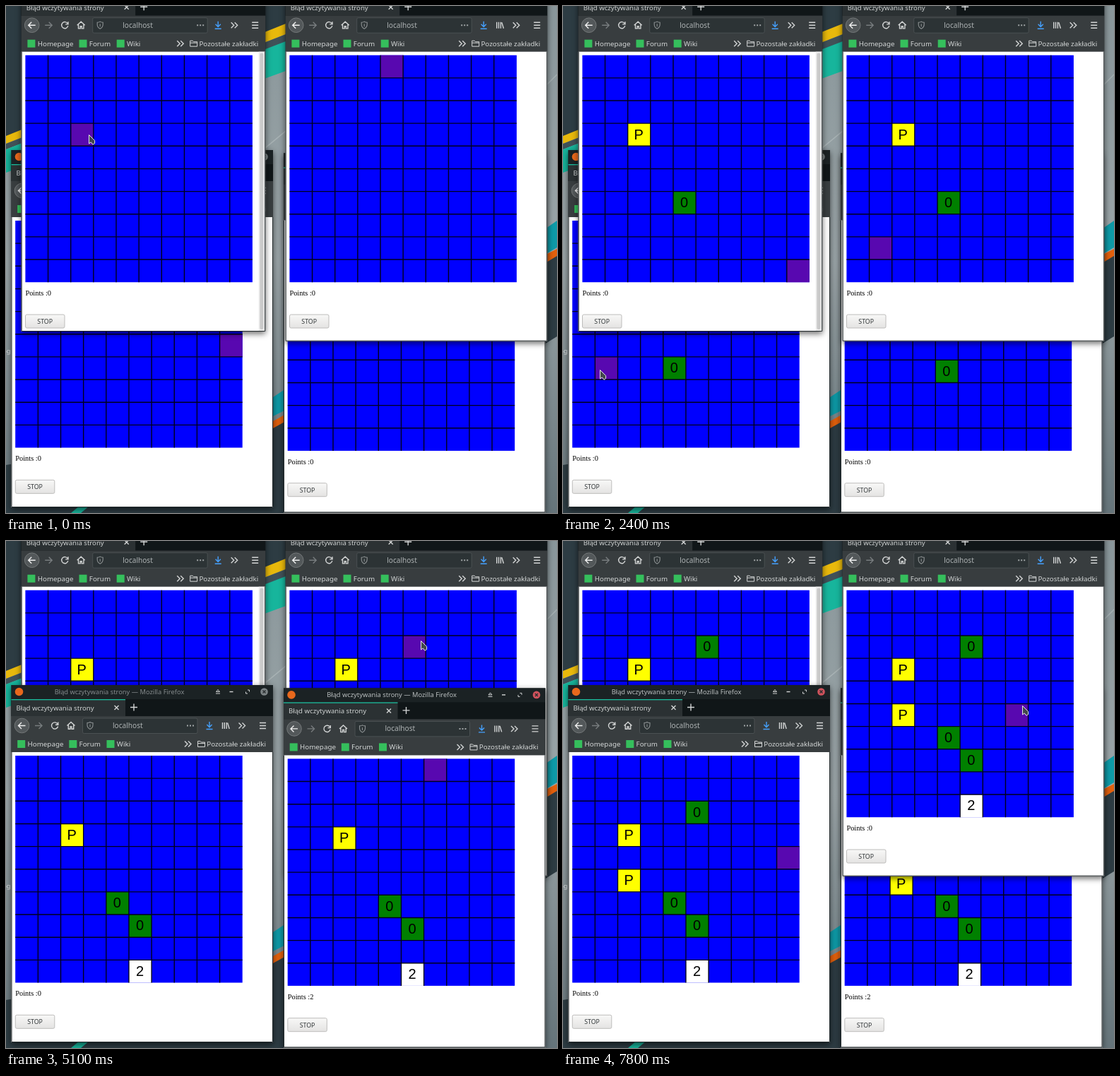
These frames come from a looping animation (780x718 px, 8 s). An HTML page:

```html
<!DOCTYPE html>
<html lang="pl">
<head>
<meta charset="utf-8">
<title>Board game in four windows</title>
<style>
html, body { margin: 0; width: 100%; height: 100%; overflow: hidden; background: #3a474d; }
svg { display: block; width: 780px; height: 718px; font-family: "Noto Sans", sans-serif; }
.frame { filter: drop-shadow(0 3px 4px #0009); }
.line { fill: none; stroke: #d3d5d5; stroke-width: 1.4; }
.mark { font: 20px "Liberation Sans", Arial, sans-serif; text-anchor: middle; }
.points { font: 10.4px "Liberation Serif", "Times New Roman", serif; }
</style>
</head>
<body>
<svg id="stage" viewBox="0 0 780 718" xmlns="http://www.w3.org/2000/svg">
  <defs>
    <linearGradient id="button" x2="0" y2="1"><stop stop-color="#f8f8f7"/><stop offset="1" stop-color="#e4e3e2"/></linearGradient>
    <linearGradient id="metal" x2="0" y2="1"><stop stop-color="#89969a"/><stop offset=".5" stop-color="#9ba5a8"/><stop offset="1" stop-color="#65747a"/></linearGradient>
  </defs>
  <g id="wallpaper">
    <path fill="url(#metal)" d="M0 0H780V718H0Z"/>
    <path fill="#2d3c43" d="M0 0H396V28L0 186Z"/>
    <path fill="#e8b90c" d="M0 184L396 25V40L0 195Z"/>
    <path fill="#405158" d="M0 195L396 40V52L0 203Z"/>
    <path fill="#17b59c" d="M0 203L396 50V92L0 236Z"/>
    <path fill="#2d3c43" d="M0 718V650L380 590 780 352V468L396 700V718Z"/>
    <path fill="#0e9aa7" d="M360 566L396 542V572L360 590ZM760 318L780 304V342L760 354Z"/>
    <path fill="#e2600d" d="M360 598L396 578V588L360 608ZM760 354L780 344V354L760 366Z"/>
    <path fill="#17b59c" d="M92 718L104 708H118L106 718Z"/>
    <path fill="#c0c9cb" opacity=".45" d="M367 200L396 176V178L367 202ZM766 110L780 96V98L766 112Z"/>
    <text x="6.5" y="492" font-size="9.5" fill="#e2e5e6" text-anchor="end">og</text>
  </g>
  <g id="windows"></g>
  <path id="cursor" fill="#42474a" stroke="#e4e6e6" d="M.5 .5V13L3.2 10.8 6 14.3 8.6 12.4V8.6Z"/>
</svg>
<script>
const LOOP = 8000, STEP = 100;
const CELL = 32.15, SIZE = 10, BOARD_X = 5.7, BOARD_Y = 100;
const COLORS = { P: '#ff0', 0: '#008000', 2: '#fff' };
const HOVER = '#5808b0';

const windows = {
  C: { x: 7.5, y: 204, w: 370.5, h: 506 },
  D: { x: 393, y: 208.4, w: 370.5, h: 509 },
  A: { x: 21.7, y: -30.3, w: 345.5, h: 491.3, narrow: true },
  B: { x: 395.7, y: -30.3, w: 370.5, h: 505 },
};

// Pointer path: time, x, y
const path = [
  [0, 117, 182], [800, 117, 182], [1300, 533, 281], [1900, 533, 281],
  [2400, 52, 515], [3100, 52, 515], [3200, 314, 556], [3300, 330, 560],
  [3600, 567, 607], [4200, 567, 607], [4700, 605, 325], [4900, 598, 220],
  [5100, 587, 141], [5200, 587, 141], [5500, 405, 245], [5600, 318, 345],
  [5700, 318, 345], [6000, 100, 471], [6500, 100, 471], [6600, 100, 472],
  [6700, 100, 472], [6800, 125, 467], [7100, 310, 446], [7600, 613, 279],
  [7800, 650, 233], [LOOP, 650, 233],
];

// Cells are [row, column, mark]
const events = [
  { time: 600, cell: [3, 2, 'P'] },
  { time: 1700, cell: [6, 4, '0'] },
  { time: 3200, cell: [7, 5, '0'], raise: 'C', focus: 'C', hover: { C: [7, 7] } },
  { time: 4000, raise: 'D', focus: 'D' },
  { time: 4100, cell: [9, 5, '2'], winner: 'D' },
  { time: 5200, cell: [2, 5, '0'], raise: 'B', focus: 'B' },
  { time: 6200, cell: [5, 2, 'P'], focus: 'C' },
];

const text = (x, y, size, fill, content, anchor = 'start') =>
  `<text x="${x}" y="${y}" font-size="${size}" fill="${fill}" text-anchor="${anchor}">${content}</text>`;
const rect = (x, y, w, h, fill, more = '') =>
  `<rect x="${x}" y="${y}" width="${w}" height="${h}" fill="${fill}" ${more}/>`;
const icon = (x, y, d, more = '') =>
  `<path class="line" transform="translate(${x} ${y})" d="${d}" ${more}/>`;

const CHEVRONS = 'M-4.5-4l4 4-4 4M.5-4l4 4-4 4';
const CLOSE = 'M-3-3L3 3M3-3L-3 3';

function titleBar(w) {
  return rect(0, 0, w, 20, '#1b2224') +
    '<circle cx="11" cy="9.5" r="5.8" fill="#e8681c"/>' +
    `<text class="title" x="153" y="12.8" font-size="9.3" text-anchor="middle">Błąd wczytywania strony — Mozilla Firefox</text>` +
    icon(w - 78, 9.5, 'M-2.5 0L0-3 2.5 0ZM-3 2.5H3', 'style="stroke-width:1"') +
    icon(w - 59, 9.5, 'M-2.5 0H2.5') +
    icon(w - 36, 9.5, 'M0-2.5H2.5V0M0 2.5H-2.5V0', 'style="stroke-width:1"') +
    `<circle class="close" cx="${w - 12.5}" cy="9.5" r="5.3"/>` +
    icon(w - 12.5, 9.5, 'M-2-2L2 2M2-2L-2 2', 'style="stroke:#2a2f31"');
}

function tabBar(w) {
  return rect(0, 20, w, 24, '#101618') + rect(0, 20, 161.5, 24, '#2b3133') +
    rect(0, 20, 161.5, 1.3, '#1abc9c') +
    text(7, 36, 9.6, '#cfd2d2', 'Błąd wczytywania strony') +
    icon(149, 32, CLOSE) + icon(173.5, 31.5, 'M-5 0H5M0-5V5');
}

function navBar(w, narrow) {
  const y = 57.5;
  return rect(0, 44, w, 51, '#383d3f') +
    `<circle cx="15" cy="${y}" r="10.3" fill="#53585a" stroke="#75797a"/>` +
    icon(15, y, 'M5 0H-4.5M-.5-4.5L-5 0-.5 4.5', 'style="stroke:#f0f0f0"') +
    icon(38.5, y, 'M-5 0H4.5M.5-4.5L5 0 .5 4.5', 'style="stroke:#777c7e"') +
    icon(61.5, y, 'M4-2.5A4.6 4.6 0 1 0 4.6 1M4.8-5V-1.3H1') +
    icon(84.5, y, 'M-5.5 0L0-5 5.5 0M-3.7-1V4.7H-1V1.5H1V4.7H3.7V-1') +
    rect(101, 47, 162.5, 21.5, '#2c3335', 'rx="2" stroke="#4b5153"') +
    icon(111.5, y, 'M-4-4Q-1-4 0-5 1-4 4-4V-1Q4 3 0 5-4 3-4-1ZM0-2V2', 'style="stroke:#8d9293;stroke-width:1.1"') +
    text(143.5, 61, 10.1, '#aeb3b4', 'localhost') +
    icon(253.5, y, 'M-5 0H-3M-1 0H1M3 0H5', 'style="stroke-width:2;stroke:#a0a5a6"') +
    icon(w - (narrow ? 67 : 90), y, 'M0-5.5V2M-3.6-1.4L0 2.2 3.6-1.4M-4.5 5H4.5', 'style="stroke:#45a1ff"') +
    (narrow ? '' : icon(w - 67, y, 'M-4.5-4.5V4.5M-1.7-4.5V4.5M1.2-4.5V4.5M2.6-4L5.2 4.5')) +
    icon(w - 44, y, CHEVRONS) + icon(w - 14.5, y, 'M-4.5-4H4.5M-4.5 0H4.5M-4.5 4H4.5');
}

function bookmarks(w) {
  const links = [[8.7, 'Homepage'], [81.8, 'Forum'], [135, 'Wiki']];
  return links.map(([x, label]) =>
    rect(x, 78, 11, 11, '#35bf5c') + text(x + 14.3, 87, 9.8, '#d3d6d6', label)).join('') +
    icon(w - 120.5, 83.5, CHEVRONS) +
    icon(w - 101.5, 83.5, 'M-5 4V-4H-1.5L0-2.5H5V4ZM-5-1H5', 'style="stroke-width:1"') +
    text(w - 10, 87, 9.8, '#d3d6d6', 'Pozostałe zakładki', 'end');
}

function boardLines() {
  let d = '';
  for (let i = 1; i < SIZE; i++) d += `M${i * CELL} 0v${SIZE * CELL}M0 ${i * CELL}h${SIZE * CELL}`;
  return `<path d="${d}" stroke="#00001c" stroke-width="1.4"/>`;
}

function page(w, h, narrow) {
  return rect(0, 95, w, h - 95, '#fff') +
    `<g transform="translate(${BOARD_X} ${BOARD_Y})">` +
    rect(0, 0, SIZE * CELL, SIZE * CELL, '#00f') +
    `<g class="cells"></g>${boardLines()}<g class="marks"></g></g>` +
    '<text class="points" x="5.7" y="440.3"></text>' +
    rect(5.8, 467.3, 55.5, 19, 'url(#button)', 'rx="2" stroke="#bdbcbb"') +
    text(33.5, 480.3, 8.8, '#33383a', 'STOP', 'middle') +
    (narrow ? rect(w - 9.5, 95, 8.5, h - 96, '#ececec') + rect(w - 7.8, 97, 5, h - 100, '#cacaca', 'rx="2"') : '') +
    `<path d="M.5 95V${h - .5}H${w - .5}V95" fill="none" stroke="#22292b"/>`;
}

const layer = document.getElementById('windows');
const cursor = document.getElementById('cursor');
for (const win of Object.values(windows)) {
  const { x, y, w, h, narrow } = win;
  win.node = document.createElementNS('http://www.w3.org/2000/svg', 'g');
  win.node.setAttribute('transform', `translate(${x} ${y})`);
  win.node.innerHTML = rect(0, 0, w, h, '#1b2224', 'class="frame"') +
    titleBar(w) + tabBar(w) + navBar(w, narrow) + bookmarks(w) + page(w, h, narrow);
  for (const name of ['title', 'close', 'cells', 'marks', 'points']) {
    win[name] = win.node.querySelector('.' + name);
  }
}

function pointerAt(time) {
  const i = path.findIndex(p => p[0] > time);
  const [t0, x0, y0] = path[i - 1], [t1, x1, y1] = path[i];
  const k = (time - t0) / (t1 - t0);
  return [x0 + (x1 - x0) * k, y0 + (y1 - y0) * k];
}

function hitCell([px, py], order) {
  const id = [...order].reverse().find(name => {
    const { x, y, w, h } = windows[name];
    return px >= x && px < x + w && py >= y && py < y + h;
  });
  if (!id) return null;
  const column = Math.floor((px - windows[id].x - BOARD_X) / CELL);
  const row = Math.floor((py - windows[id].y - BOARD_Y) / CELL);
  const inside = Math.min(row, column) >= 0 && Math.max(row, column) < SIZE;
  return inside ? { id, cell: [row, column] } : null;
}

// Replays the session up to the given time; each board keeps its last hovered cell.
function stateAt(time) {
  const state = {
    order: ['C', 'D', 'A', 'B'], focus: 'A', winner: null, open: [],
    hover: { A: [3, 2], B: [0, 4], C: [5, 9] }, pointer: pointerAt(0),
  };
  for (let t = 0; t <= time; t += STEP) {
    const next = pointerAt(t);
    const moved = next.some((v, i) => Math.abs(v - state.pointer[i]) > .01);
    state.pointer = next;
    const hit = moved && hitCell(next, state.order);
    if (hit) state.hover[hit.id] = hit.cell;
    const event = events.find(e => e.time === t);
    if (!event) continue;
    if (event.raise) state.order = [...state.order.filter(id => id !== event.raise), event.raise];
    if (event.cell) {
      state.open.push(event.cell);
      state.hover = { ...event.hover };
    }
    state.focus = event.focus || state.focus;
    state.winner = event.winner || state.winner;
  }
  return state;
}

const fillCell = ([row, column], color) => rect(column * CELL, row * CELL, CELL, CELL, color);

function draw(time) {
  const state = stateAt(time);
  const marks = state.open.map(([row, column, mark]) =>
    `<text class="mark" x="${column * CELL + 15.6}" y="${row * CELL + 22.4}">${mark}</text>`).join('');
  for (const id of state.order) {
    const win = windows[id], active = state.focus === id, hover = state.hover[id];
    win.cells.innerHTML = state.open.map(cell => fillCell(cell, COLORS[cell[2]])).join('') +
      (hover ? fillCell(hover, HOVER) : '');
    win.marks.innerHTML = marks;
    win.points.textContent = 'Points :' + (state.winner === id ? 2 : 0);
    win.title.setAttribute('fill', active ? '#b9bebf' : '#858b8d');
    win.close.setAttribute('fill', active ? '#d0525c' : '#7b8284');
    layer.append(win.node);
  }
  cursor.setAttribute('transform', `translate(${state.pointer.join(' ')})`);
}

const start = performance.now();
let shown = -1;
function tick() {
  const step = Math.floor((performance.now() - start) % LOOP / STEP);
  if (step !== shown) draw((shown = step) * STEP);
  requestAnimationFrame(tick);
}
tick();
</script>
</body>
</html>
```
